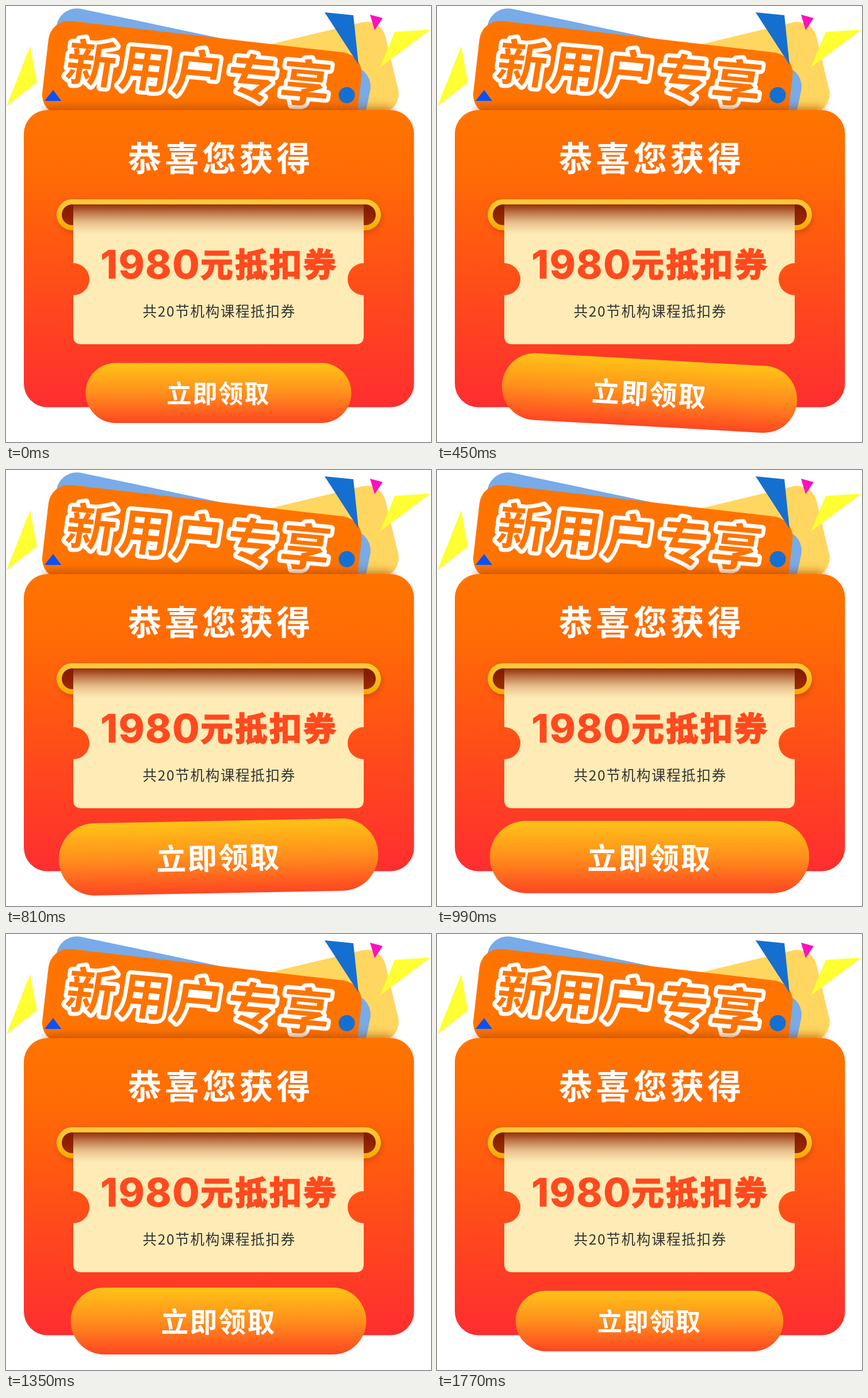
These frames come from a looping animation (739x758 px, 1800 ms). An HTML page:

```html
<!DOCTYPE html>
<html lang="zh-CN">
<head>
<meta charset="utf-8">
<style>
html, body { margin: 0; width: 100%; height: 100%; overflow: hidden; background: #fff; }
svg { display: block; width: 100%; height: 100%; }
text { font-family: "Noto Sans CJK SC", "Noto Sans CJK", sans-serif; font-weight: 700; fill: #fff; }
.title { font-size: 87px; letter-spacing: 6.6px; text-anchor: middle; fill: #ff7400;
  stroke: #fff; stroke-width: 14px; stroke-linejoin: round; paint-order: stroke; }
.heading { font-size: 59px; letter-spacing: 5.7px; }
.price { font-size: 56px; letter-spacing: 3.7px; fill: #ff4a1f; stroke: #ff4a1f; stroke-width: 2.4px; }
.digits { font: 800 69px Inter, sans-serif; letter-spacing: 1px; stroke: none; }
.note { font-size: 24.5px; letter-spacing: 1.7px; font-weight: 400; fill: #333; }
.label { font-size: 43px; letter-spacing: 2px; }
</style>
</head>
<body>
<svg viewBox="0 0 739 758">
  <defs>
    <linearGradient id="card" x2="0" y2="1">
      <stop stop-color="#ff7400"/><stop offset=".2" stop-color="#ff6c04"/><stop offset="1" stop-color="#ff2d30"/>
    </linearGradient>
    <linearGradient id="gold" x2="0" y2="1">
      <stop stop-color="#ffcb3c"/><stop offset="1" stop-color="#f5ab00"/>
    </linearGradient>
    <linearGradient id="slot" x2="0" y2="1">
      <stop stop-color="#7c1a00"/><stop offset="1" stop-color="#a02a04"/>
    </linearGradient>
    <linearGradient id="shade" x2="0" y2="1">
      <stop stop-color="#932c08"/><stop offset=".25" stop-color="#9c3a10" stop-opacity=".7"/>
      <stop offset=".6" stop-color="#a84c1c" stop-opacity=".28"/><stop offset="1" stop-color="#b86030" stop-opacity="0"/>
    </linearGradient>
    <linearGradient id="pill" x2="0" y2="1">
      <stop stop-color="#ffc317"/><stop offset=".5" stop-color="#ff8f1c"/><stop offset="1" stop-color="#ff4622"/>
    </linearGradient>
    <filter id="blur" x="-10%" y="-150%" width="120%" height="400%"><feGaussianBlur stdDeviation="8"/></filter>
    <filter id="soft" x="-10%" y="-50%" width="120%" height="200%"><feGaussianBlur stdDeviation="4"/></filter>
  </defs>

  <!-- stacked banners -->
  <rect x="-300" width="300" height="162" rx="34" fill="#ffd65f" transform="translate(652 20.5) rotate(-13.5)"/>
  <rect width="557" height="165" rx="36" fill="#78abe8" transform="translate(95.5 -2.5) rotate(11.9)"/>
  <rect width="548" height="165" rx="36" fill="#ff7400" transform="translate(78 22) rotate(6.6)"/>
  <text class="title" x="3.3" y="33" transform="translate(335 116) rotate(5.2) skewX(-4)">新用户专享</text>
  <rect x="68" y="176" width="604" height="20" fill="#a03c00" opacity=".6" filter="url(#blur)"/>

  <!-- confetti -->
  <path d="M42 70L54 133L1 174ZM676 45L738 41L650 107Z" fill="#ffff33"/>
  <path d="M82 146L96 165H67Z" fill="#0d50f5"/>
  <path d="M554 11L604 16L613 102Z" fill="#156fd0"/>
  <path d="M633 15L655 21L641 42Z" fill="#ff10c0"/>
  <circle cx="592.5" cy="155" r="14" fill="#156fd0"/>

  <rect x="31" y="181" width="678.5" height="516.5" rx="41" fill="url(#card)"/>
  <text class="heading" x="211.5" y="286.5">恭喜您获得</text>

  <!-- slot and ticket -->
  <rect x="90" y="341" width="564" height="54" rx="27" fill="#b03000" opacity=".4" filter="url(#soft)"/>
  <rect x="88" y="336" width="564" height="54" rx="27" fill="url(#gold)"/>
  <rect x="97" y="345" width="546" height="36" rx="18" fill="url(#slot)"/>
  <path d="M117 345H622V447A28 28 0 0 0 622 503V574Q622 588 608 588H131Q117 588 117 574V503A28 28 0 0 0 117 447Z" fill="#ffebb5"/>
  <rect x="117" y="345" width="505" height="52" fill="url(#shade)"/>
  <text class="price digits" x="164" y="473.5">1980</text>
  <text class="price" x="338.5" y="470">元抵扣券</text>
  <text class="note" x="237.5" y="539.5">共20节机构课程抵扣券</text>

  <g id="button">
    <rect x="-231" y="-52.25" width="462" height="104.5" rx="52.25" fill="url(#pill)"/>
    <text class="label" x="-90" y="17.5">立即领取</text>
  </g>
</svg>
<script>
const LOOP = 1800, STEP = 30;
// [ms, degrees]
const swing = [[0, 0], [147, -2], [360, 7], [630, -4.4], [870, 0], [LOOP, 0]];
const button = document.getElementById('button');

function angleAt(t) {
  const i = swing.findIndex(key => key[0] > t);
  const [t0, a0] = swing[i - 1], [t1, a1] = swing[i];
  return a0 + (a1 - a0) * (t - t0) / (t1 - t0);
}

function draw(now) {
  const t = Math.floor(now % LOOP / STEP) * STEP;
  const scale = 1 + 0.00025 * Math.min(t, LOOP - t);
  button.setAttribute('transform', `translate(369.5 672.8) rotate(${angleAt(t)}) scale(${scale})`);
}

const start = performance.now();
function tick() {
  draw(performance.now() - start);
  requestAnimationFrame(tick);
}
tick();
</script>
</body>
</html>
```
